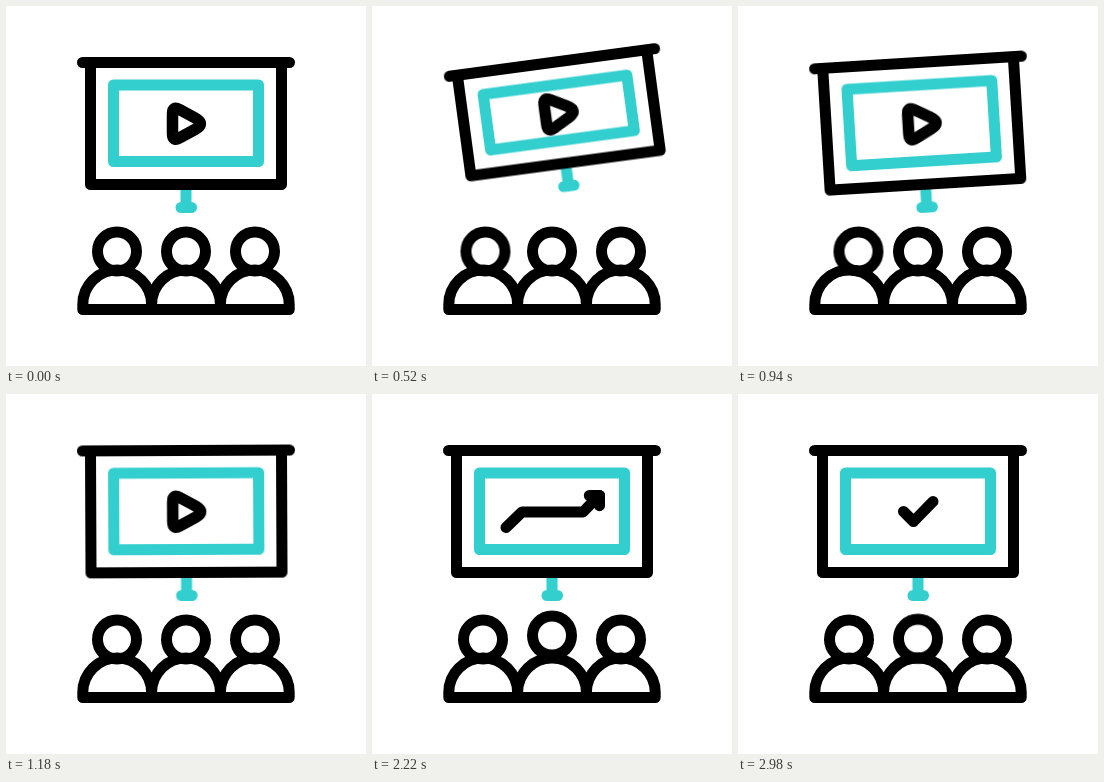
An HTML page without scripts that plays this animation: 360 by 360 pixels, repeating every 3 s.

```html
<!DOCTYPE html>
<html lang="en">
<head>
<meta charset="utf-8">
<title>Presentation</title>
<style>
  html, body { margin: 0; width: 100%; height: 100%; overflow: hidden; background: #fff; }
  svg { display: block; width: 100%; height: 100%; }
  svg * { animation: 3s linear infinite; }

  /* --roll: how far the screen is pulled up */
  @property --roll { syntax: "<length>"; inherits: true; initial-value: 0px; }

  .ink, .teal {
    fill: none; stroke: #000; stroke-width: 11;
    stroke-linecap: round; stroke-linejoin: round;
  }
  .teal { stroke: #32cfce; }

  .board { transform-origin: 180px 56.5px; animation-name: swing, roll; }
  .frame { height: calc(122px - var(--roll)); }
  .panel { height: calc(76.5px - var(--roll)); }
  .pole { transform: translateY(calc(var(--roll) * -1)); }
  .icons { transform: translateY(calc(var(--roll) * -.5)); }

  .play { stroke-width: 11.5; animation-name: play; }
  .arrow { animation-name: arrow; }
  .check { animation-name: check; }
  .line { stroke-dasharray: 107; animation-name: draw-line; }
  .leg { stroke-dasharray: 14; animation-name: draw-leg; }
  .tick { stroke-dasharray: 43; animation-name: draw-tick; }

  .left { animation-name: lean-left; }
  .right { animation-name: lean-right; }
  .middle { animation-name: stretch; }

  @keyframes swing {
    0% { transform: rotate(0deg); animation-timing-function: ease-in-out; }
    16.7% { transform: rotate(-7.9deg); animation-timing-function: cubic-bezier(.37, 0, .63, 1); }
    25.3% { transform: rotate(7.9deg); animation-timing-function: cubic-bezier(.37, 0, .63, 1); }
    32.3% { transform: rotate(-4deg); animation-timing-function: cubic-bezier(.37, 0, .63, 1); }
    40.7%, 100% { transform: rotate(0deg); }
  }
  @keyframes roll {
    0% { --roll: 0px; animation-timing-function: ease-in-out; }
    16.3% { --roll: 21px; animation-timing-function: cubic-bezier(.37, 0, .63, 1); }
    26.3%, 100% { --roll: 0px; }
  }

  @keyframes play {
    0%, 48.4% { visibility: visible; animation-timing-function: step-end; }
    48.5%, 100% { visibility: hidden; }
  }
  @keyframes arrow {
    0%, 48.4% { visibility: hidden; animation-timing-function: step-end; }
    48.5%, 81.3% { visibility: visible; animation-timing-function: step-end; }
    81.4%, 100% { visibility: hidden; }
  }
  @keyframes check {
    0%, 81.3% { visibility: hidden; animation-timing-function: step-end; }
    81.4%, 100% { visibility: visible; }
  }
  @keyframes draw-line {
    0%, 48.4% { stroke-dashoffset: 107; }
    72.5%, 100% { stroke-dashoffset: 0; }
  }
  @keyframes draw-leg {
    0%, 71.9% { stroke-dashoffset: 14; visibility: hidden; }
    72% { stroke-dashoffset: 14; visibility: inherit; }
    74.8%, 100% { stroke-dashoffset: 0; visibility: inherit; }
  }
  @keyframes draw-tick {
    0%, 81.4% { stroke-dashoffset: 43; }
    90%, 100% { stroke-dashoffset: 0; }
  }

  @keyframes lean-left {
    0%, 13% { transform: translateX(0); animation-timing-function: cubic-bezier(.3, .1, .7, .9); }
    28.7% { transform: translateX(11px); animation-timing-function: ease-in-out; }
    39%, 100% { transform: translateX(0); }
  }
  @keyframes lean-right {
    0%, 40% { transform: translateX(0); animation-timing-function: ease-in-out; }
    52% { transform: translateX(-13px); animation-timing-function: ease-in-out; }
    64%, 100% { transform: translateX(0); }
  }
  @keyframes stretch {
    0%, 66.7% { transform: translateY(0); animation-timing-function: ease-in-out; }
    79% { transform: translateY(-6px); animation-timing-function: ease-in-out; }
    100% { transform: translateY(-.8px); }
  }
</style>
</head>
<body>
<svg viewBox="0 0 360 360">
  <g class="board">
    <path class="teal pole" d="M180 184V201.5M175 201.5H185.5"/>
    <rect class="teal panel" x="107.5" y="79" width="145" height="76.5"/>
    <rect class="ink frame" x="84.5" y="56.5" width="191" height="122"/>
    <path class="ink" d="M76.5 56.5H283.5"/>
    <g class="ink icons">
      <path class="play" d="M166.5 107.7Q166.5 99.7 173.5 103.5L189.2 112Q199.6 117.7 189.2 123.4L173.5 131.9Q166.5 135.7 166.5 127.7Z"/>
      <g class="arrow">
        <path class="line" d="M134 133.5L150 118H211L227 101.5"/>
        <path class="leg" d="M227.5 101.5H213.5"/>
        <path class="leg" d="M227.5 101.5V115.5"/>
      </g>
      <g class="check">
        <path class="tick" d="M165.5 117.5L175.5 127.5L195 107.5"/>
      </g>
    </g>
  </g>

  <g class="ink">
    <circle class="left" cx="111" cy="245.5" r="19.5"/>
    <circle class="middle" cx="180" cy="245.5" r="19.5"/>
    <circle class="right" cx="249" cy="245.5" r="19.5"/>
    <path d="M76.8 303.5v-5a34.4 34.4 0 0 1 68.8 0v5v-5a34.4 34.4 0 0 1 68.8 0v5v-5a34.4 34.4 0 0 1 68.8 0v5Z"/>
  </g>
</svg>
</body>
</html>
```
